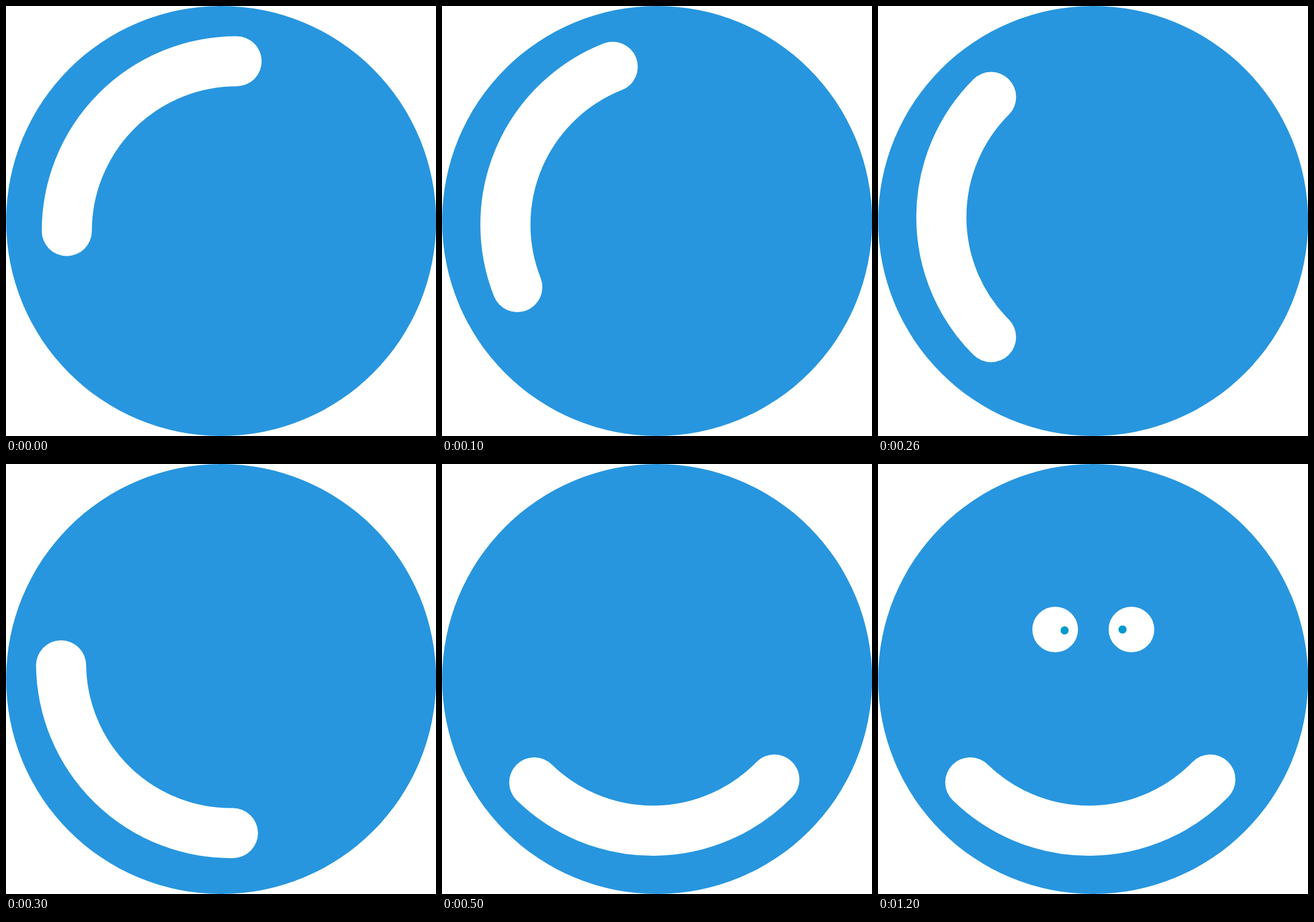
Animation of 708 by 708 pixels, one loop 1.6 s. Source, as an HTML page:

```html
<!DOCTYPE html>
<html lang="en">
<head>
<meta charset="utf-8">
<title>Rolling smile</title>
<style>
  html, body { margin: 0; width: 100%; height: 100%; overflow: hidden; background: #fff; }
  svg { display: block; width: 100%; height: 100%; }
</style>
</head>
<body>
<svg viewBox="0 0 708 708">
  <circle cx="354.2" cy="354" r="354" fill="#2796df"/>
  <path id="smile" d="M379.7 91A279.6 279.6 0 0 0 100.1 370.5"
        fill="none" stroke="#fff" stroke-width="82.5" stroke-linecap="round"/>
  <g id="eyes" fill="#fff" visibility="hidden">
    <circle cx="291.7" cy="272.5" r="37.6"/>
    <circle cx="417.3" cy="272.5" r="37.6"/>
    <g fill="#09c">
      <circle cx="307.2" cy="274" r="6.7"/>
      <circle cx="402.6" cy="272.5" r="6.7"/>
    </g>
  </g>
</svg>
<script>
  const LOOP = 1600, STEP = 100;
  const turns = [0, 21.6, 45, 90.7, 111.6, 135.7]; // degrees, counterclockwise
  const smile = document.getElementById('smile');
  const eyes = document.getElementById('eyes');
  const start = performance.now();

  function draw() {
    const step = Math.floor((performance.now() - start) % LOOP / STEP);
    const turn = turns[Math.min(step, turns.length - 1)];
    smile.setAttribute('transform', `rotate(${-turn} 354 354)`);
    eyes.setAttribute('visibility', step >= turns.length ? 'visible' : 'hidden');
    requestAnimationFrame(draw);
  }
  draw();
</script>
</body>
</html>
```
